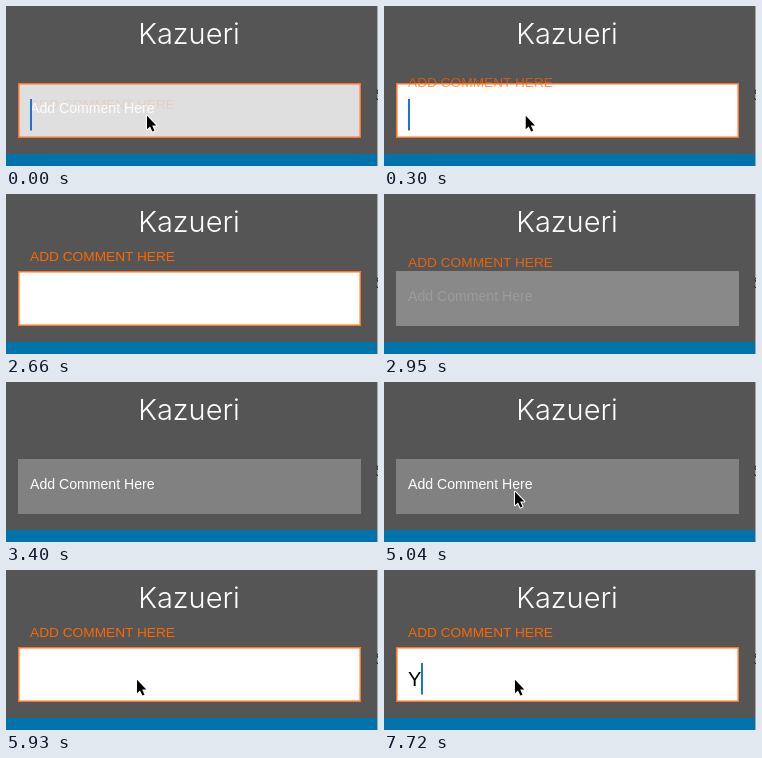
Animation, 372 px wide and 160 px high, one loop 8 s. Source, as an HTML page:

```html
<!DOCTYPE html>
<html lang="en">
<head>
<meta charset="utf-8">
<title>Floating label field</title>
<style>
  html, body { margin: 0; width: 100%; height: 100%; overflow: hidden; background: #555; }
  svg { display: block; width: 372px; height: 160px; }
  text { font-family: "Liberation Sans", Arial, sans-serif; }
  .name { font: 300 29px Inter, "Liberation Sans", sans-serif; fill: #fff; text-anchor: middle; }
  #hint { font-size: 14.1px; fill: #fff; }
  #label { font-size: 13.7px; fill: #ff6600; }
  #typed { font-size: 20px; fill: #000; }
</style>
</head>
<body>
<svg viewBox="0 0 372 160">
  <rect width="372" height="160" fill="#555"/>
  <rect y="148" width="372" height="12" fill="#0073aa"/>
  <rect x="371" width="1" height="160" fill="#a4a4a4"/>
  <path d="M372 83.5Q369.8 85.5 372 88M370.3 92L372 94" fill="none" stroke="#222" stroke-width="1"/>
  <text class="name" x="183" y="38">Kazueri</text>

  <rect x="12" y="77" width="343" height="55" fill="#818181"/>
  <rect id="paper" x="12" y="77" width="343" height="55" fill="#fff"/>
  <rect id="border" x="12.75" y="77.75" width="341.5" height="53.5" fill="none" stroke="#ff7426" stroke-width="1.5"/>
  <text id="label" x="24">ADD COMMENT HERE</text>
  <text id="hint" x="24" y="107">Add Comment Here</text>
  <text id="typed" x="24" y="116">Y</text>
  <rect id="caret" x="24" y="93" width="2" height="31.5" fill="#1c74d8"/>
  <path id="cursor" d="M.5 .8V14.2L3.5 11.4L5.9 16.6L8 15.7L5.7 10.5H9.8Z"
        fill="#000" stroke="#fff" stroke-width="2" paint-order="stroke" stroke-linejoin="round"/>
</svg>
<script>
  const LOOP = 8000, STEP = LOOP / 54;
  const el = id => document.getElementById(id);
  const [paper, border, label, hint, typed, caret, cursor] =
    ["paper", "border", "label", "hint", "typed", "caret", "cursor"].map(el);
  const clamp = v => Math.min(1, Math.max(0, v));
  const ease = v => v * v * (3 - 2 * v);
  const show = (node, alpha) => node.setAttribute("opacity", alpha);

  // Pointer stops: [tick, x, y]
  const visits = [
    [[0, 140.5, 109], [7, 143, 109], [8, 162, 109], [9, 196, 108], [10, 211.5, 106.5],
     [11, 211, 107], [12, 205, 108], [13, 205, 108], [14, 200, 146]],
    [[32, 131, 138], [33, 131, 118], [34, 130.5, 109], [54, 130.5, 109]]
  ];

  function pointerAt(k) {
    const path = visits.find(v => k >= v[0][0] && k <= v[v.length - 1][0]);
    if (!path) return null;
    const i = Math.max(1, path.findIndex(p => p[0] >= k));
    const [a, b] = [path[i - 1], path[i]];
    const u = (k - a[0]) / (b[0] - a[0]);
    return [a[1] + (b[1] - a[1]) * u, a[2] + (b[2] - a[2]) * u];
  }

  function caretAt(k) {
    if (k === 0 || k >= 52) return 1;
    if (k < 20) return blink(k, 1.65);
    return k >= 36 ? blink(k - 35, 2) : 0;
  }

  function blink(k, centre) {
    return clamp(2.25 - Math.abs(k % 7 - centre));
  }

  function draw(k) {
    const blurring = k >= 20 && k < 36;
    const u = clamp(blurring ? (k - 19) / 4 : (k - (k < 20 ? -1 : 35)) / 5);
    const toward = v => blurring ? 1 - clamp(v) : clamp(v);
    const focus = toward(u), rise = ease(focus);

    show(paper, toward(u * 3.75));
    show(border, toward(u * 5));
    show(label, rise);
    label.setAttribute("y", 107 - 40 * rise);
    show(hint, 1 - rise);

    const hasText = k >= 52;
    show(typed, hasText ? 1 : 0);
    caret.setAttribute("x", hasText ? 37 : 24);
    show(caret, caretAt(k));

    const at = pointerAt(k);
    show(cursor, at ? 1 : 0);
    if (at) cursor.setAttribute("transform", `translate(${at})`);
  }

  function tick() {
    const t = performance.now() % LOOP;
    draw(Math.min(53, Math.floor((t + 14) / STEP)));
    requestAnimationFrame(tick);
  }
  tick();
</script>
</body>
</html>
```
